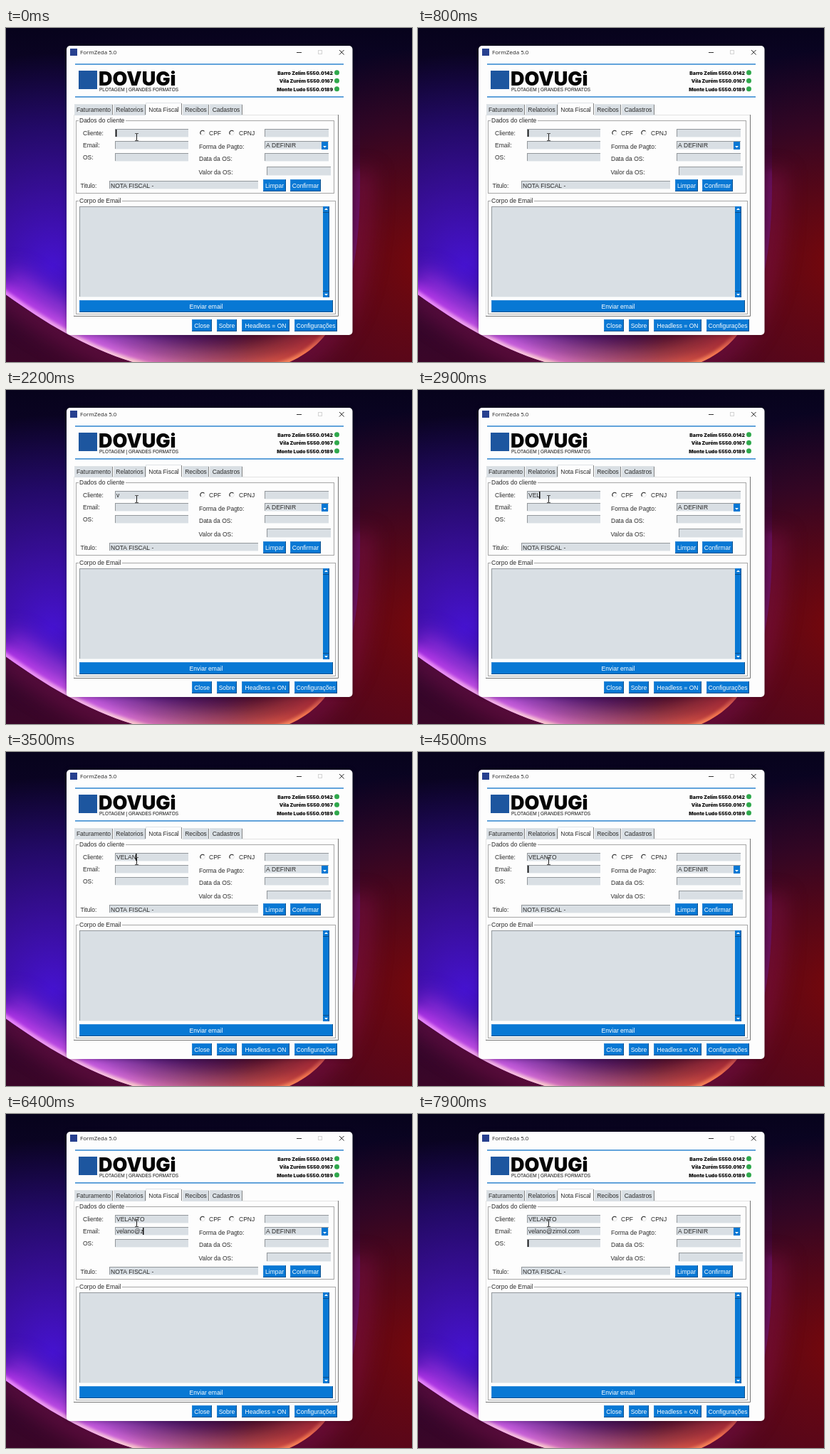
These frames come from a looping animation (570x470 px, 8 s). An HTML page with a canvas:

```html
<!DOCTYPE html>
<html lang="pt">
<head>
<meta charset="utf-8">
<style>
  html, body { margin: 0; width: 100%; height: 100%; overflow: hidden; background: #08021a; }
  canvas { display: block; }
</style>
</head>
<body>
<canvas id="stage" width="570" height="470"></canvas>
<script>
const W = 570, H = 470, LOOP = 8000;
const BLUE = '#0878d4', FIELD = '#d9dfe4', INK = '#2b2b2b';
const UI = '8.5px "Liberation Sans", Arial, sans-serif';
const stage = document.getElementById('stage').getContext('2d');
let ctx = stage;

function rect(x, y, w, h, color) {
  ctx.fillStyle = color;
  ctx.fillRect(x, y, w, h);
}

function text(str, x, y, { font = UI, color = INK, align = 'left' } = {}) {
  ctx.font = font;
  ctx.fillStyle = color;
  ctx.textAlign = align;
  ctx.fillText(str, x, y);
}

function disc(x, y, r, color) {
  ctx.fillStyle = color;
  ctx.beginPath();
  ctx.arc(x, y, r, 0, Math.PI * 2);
  ctx.fill();
}

function path(points, color, width = 1) {
  ctx.strokeStyle = color;
  ctx.lineWidth = width;
  ctx.beginPath();
  points.forEach(([x, y]) => ctx.lineTo(x, y));
  ctx.stroke();
}

function triangle(x, y, dir) {
  ctx.fillStyle = '#fff';
  ctx.beginPath();
  ctx.moveTo(x - 2.5, y - dir);
  ctx.lineTo(x + 2.5, y - dir);
  ctx.lineTo(x, y + 1.5 * dir);
  ctx.fill();
}

function gradient(x0, y0, x1, y1, stops) {
  const g = ctx.createLinearGradient(x0, y0, x1, y1);
  stops.forEach(([at, color]) => g.addColorStop(at, color));
  return g;
}

function glow(x, y, r, rgb, alpha) {
  const g = ctx.createRadialGradient(x, y, 0, x, y, r);
  g.addColorStop(0, `rgba(${rgb},${alpha})`);
  g.addColorStop(0.5, `rgba(${rgb},${alpha * 0.5})`);
  g.addColorStop(1, `rgba(${rgb},0)`);
  rect(0, 0, W, H, g);
}

function wallpaper() {
  rect(0, 0, W, H, gradient(0, 0, 0, H,
    [[0, '#07031c'], [0.3, '#120530'], [1, '#3a0628']]));
  glow(585, 330, 300, '125,8,8', 0.9);

  const rim = new Path2D('M-10 368C75 430 170 487 290 487C430 487 500 440 497 200');
  const inside = new Path2D(rim);
  inside.lineTo(497, 0);
  inside.lineTo(-10, 0);

  const warm = gradient(0, 0, 497, 0, [[0, '#c038f0'], [0.3, '#e878ec'], [0.5, '#f08ca4'],
    [0.75, '#ee6448'], [0.92, '#9c2030'], [1, 'rgba(90,20,120,0.3)']]);
  const hot = gradient(0, 0, 497, 0, [[0, '#f090fc'], [0.3, '#ffd8d8'], [0.6, '#ffcfa0'],
    [0.85, '#ff8050'], [1, 'rgba(120,20,110,0.3)']]);
  const halo = (width, blur, alpha, color) => {
    ctx.filter = `blur(${blur}px)`;
    ctx.globalAlpha = alpha;
    ctx.lineWidth = width;
    ctx.strokeStyle = color;
    ctx.stroke(rim);
    ctx.filter = 'none';
    ctx.globalAlpha = 1;
  };

  halo(40, 14, 0.4, '#8c1458');
  ctx.save();
  ctx.clip(inside);
  glow(65, 335, 300, '72,20,225', 0.9);
  glow(450, 290, 200, '70,10,110', 0.5);
  halo(70, 16, 0.65, warm);
  halo(24, 6, 0.6, warm);
  halo(9, 2, 0.85, hot);
  ctx.restore();
}

function field(x, y, w, h = 12) {
  rect(x, y, w, h, FIELD);
  rect(x, y, w, 1, '#92979b');
  rect(x, y, 1, h, '#92979b');
  rect(x, y + h - 1, w, 1, '#eef1f3');
}

function button(label, x, y, w) {
  rect(x, y, w, 17, '#0a4f8c');
  rect(x, y, w - 1, 16, '#2b88d8');
  rect(x + 1, y + 1, w - 2, 15, BLUE);
  text(label, x + w / 2, y + 11.5, { color: '#fff', align: 'center' });
}

function group(label, y, w, h, labelWidth) {
  ctx.strokeStyle = '#a6a6a6';
  ctx.lineWidth = 1;
  ctx.strokeRect(98.5, y + 0.5, w, h);
  rect(102, y - 3, labelWidth, 8, '#fdfdfd');
  text(label, 103, y + 3);
}

function tab(label, x, w, active) {
  const top = active ? 105 : 107;
  rect(x, top, w, 123 - top, active ? '#fdfdfd' : FIELD);
  path([[x + 0.5, 122], [x + 0.5, top + 0.5], [x + w - 1, top + 0.5]], '#dfe3e6');
  path([[x + w - 0.5, top + 1], [x + w - 0.5, 122]], '#858585');
  text(label, x + w / 2, 118, { align: 'center' });
}

function radio(label, x, labelX) {
  ctx.lineWidth = 1.2;
  ctx.strokeStyle = '#ececec';
  ctx.beginPath();
  ctx.arc(x, 147.5, 3.2, -0.7, 2.4);
  ctx.stroke();
  ctx.strokeStyle = '#2c2c2c';
  ctx.beginPath();
  ctx.arc(x, 147.5, 3.2, 2.4, 5.6);
  ctx.stroke();
  text(label, labelX, 151);
}

function header() {
  rect(90, 29, 10, 10, '#27408f');
  text('FormZeda 5.0', 104, 37.3, { font: '8px "Open Sans", sans-serif', color: '#222' });
  path([[408, 34.5], [415, 34.5]], '#333');
  ctx.strokeStyle = '#d4d4d4';
  ctx.strokeRect(438.5, 31.5, 5, 5);
  path([[468, 31], [474.5, 37.5]], '#222');
  path([[474.5, 31], [468, 37.5]], '#222');

  rect(97, 50.2, 377, 1.5, '#2f86d0');
  rect(97, 96.2, 377, 1.5, '#2f86d0');
  rect(102, 60, 26, 26, '#1d569f');
  text('DOVUGi', 130, 81, { font: '900 27px Inter, sans-serif', color: '#050505' });
  text('PLOTAGEM | GRANDES FORMATOS', 131, 88.5,
    { font: '6.5px "Liberation Sans", Arial, sans-serif', color: '#111' });
  ['Barro Zelim 5550.0142', 'Vila Zurém 5550.0167', 'Monte Ludo 5550.0189'].forEach((line, i) => {
    const y = 65.5 + i * 11.5;
    text(line, 459, y, { font: '900 6.8px Inter, sans-serif', color: '#111', align: 'right' });
    disc(464.5, y - 2.7, 3.5, '#2fa84c');
  });
}

function appWindow() {
  ctx.save();
  ctx.shadowColor = 'rgba(0,0,0,0.3)';
  ctx.shadowBlur = 6;
  ctx.fillStyle = '#fdfdfd';
  ctx.beginPath();
  ctx.roundRect(85, 25, 401.5, 407, 5);
  ctx.fill();
  ctx.restore();
  header();

  path([[95.5, 405], [95.5, 122.5], [466, 122.5]], '#e2e2e2');
  path([[95, 405.5], [466.5, 405.5], [466.5, 122]], '#747474');
  tab('Faturamento', 96, 54);
  tab('Relatorios', 151, 45);
  tab('Recibos', 248, 37);
  tab('Cadastros', 286, 46);
  tab('Nota Fiscal', 196, 51, true);

  group('Dados do cliente', 130, 362, 102, 66);
  group('Corpo de Email', 243, 364, 159, 61);
  [['Cliente:', 108, 151], ['Email:', 108, 168], ['OS:', 108, 185],
   ['Forma de Pagto:', 271, 169.5], ['Data da OS:', 271, 186.5],
   ['Valor da OS:', 270.5, 205.5], ['Titulo:', 104.5, 224.5]].forEach(label => text(...label));
  for (const y of [142, 159, 176]) {
    field(153, y, 103);
    field(363, y, 90);
  }
  field(366, 195, 90, 13);
  field(145, 215, 209);
  radio('CPF', 276, 285);
  radio('CPNJ', 317, 327);
  text('A DEFINIR', 365, 168);
  rect(443, 160, 9, 11, BLUE);
  triangle(447.5, 167, 1);
  text('NOTA FISCAL -', 147, 224.5);
  button('Limpar', 361, 213, 32);
  button('Confirmar', 399, 213, 43);

  field(103, 251, 342, 128);
  rect(445, 251, 9, 128, BLUE);
  rect(445, 259, 9, 1, '#0a4f8c');
  rect(445, 370, 9, 1, '#0a4f8c');
  rect(453, 251, 1, 128, '#0a4f8c');
  triangle(449.5, 255, -1);
  triangle(449.5, 375, 1);
  button('Enviar email', 103, 383, 356);
  button('Close', 261, 410, 28);
  button('Sobre', 296, 410, 28);
  button('Headless = ON', 331, 410, 67);
  button('Configurações', 405, 410, 60);
}

const NAME = 'VELANTO', EMAIL = 'velano@zimol.com';
const NAME_KEYS = [2600, 2700, 2900, 3100, 3300, 3600, 3900];
const EMAIL_KEYS = [4800, 5000, 5200, 5400, 5600, 5700, 6100, 6400,
                    6500, 6600, 6800, 7000, 7100, 7300, 7400, 7500];

const typed = (str, keys, t) => str.slice(0, keys.filter(k => k <= t).length);

function typing(t) {
  const slip = t >= 2000 && t < 2500;
  const name = slip ? 'v' : typed(NAME, NAME_KEYS, t);
  const email = typed(EMAIL, EMAIL_KEYS, t);
  text(name, 155, 151);
  text(email, 155, 168);

  // The caret blinks 600 ms on, 300 ms off, restarting on each focus change
  const [value, y, focused] = t < 4500 ? [name, 142, -200]
    : t < 7900 ? [email, 159, 4500] : ['', 176, 7900];
  if ((t - focused) % 900 < 600) {
    ctx.font = UI;
    rect(Math.round(154 + ctx.measureText(value).width), y + 1, 1.5, 10, '#111');
  }
}

function pointer() {
  path([[183.5, 149], [183.5, 158]], '#222');
  path([[181, 148.5], [186, 148.5]], '#555');
  path([[181, 158.5], [186, 158.5]], '#555');
}

// The wallpaper never changes, so it is painted once
const backdrop = document.createElement('canvas');
backdrop.width = W;
backdrop.height = H;
ctx = backdrop.getContext('2d');
wallpaper();
ctx = stage;

function frame(now) {
  const t = Math.floor((now % LOOP) / 100) * 100;
  ctx.drawImage(backdrop, 0, 0);
  appWindow();
  typing(t);
  pointer();
  requestAnimationFrame(frame);
}
requestAnimationFrame(frame);
</script>
</body>
</html>
```
